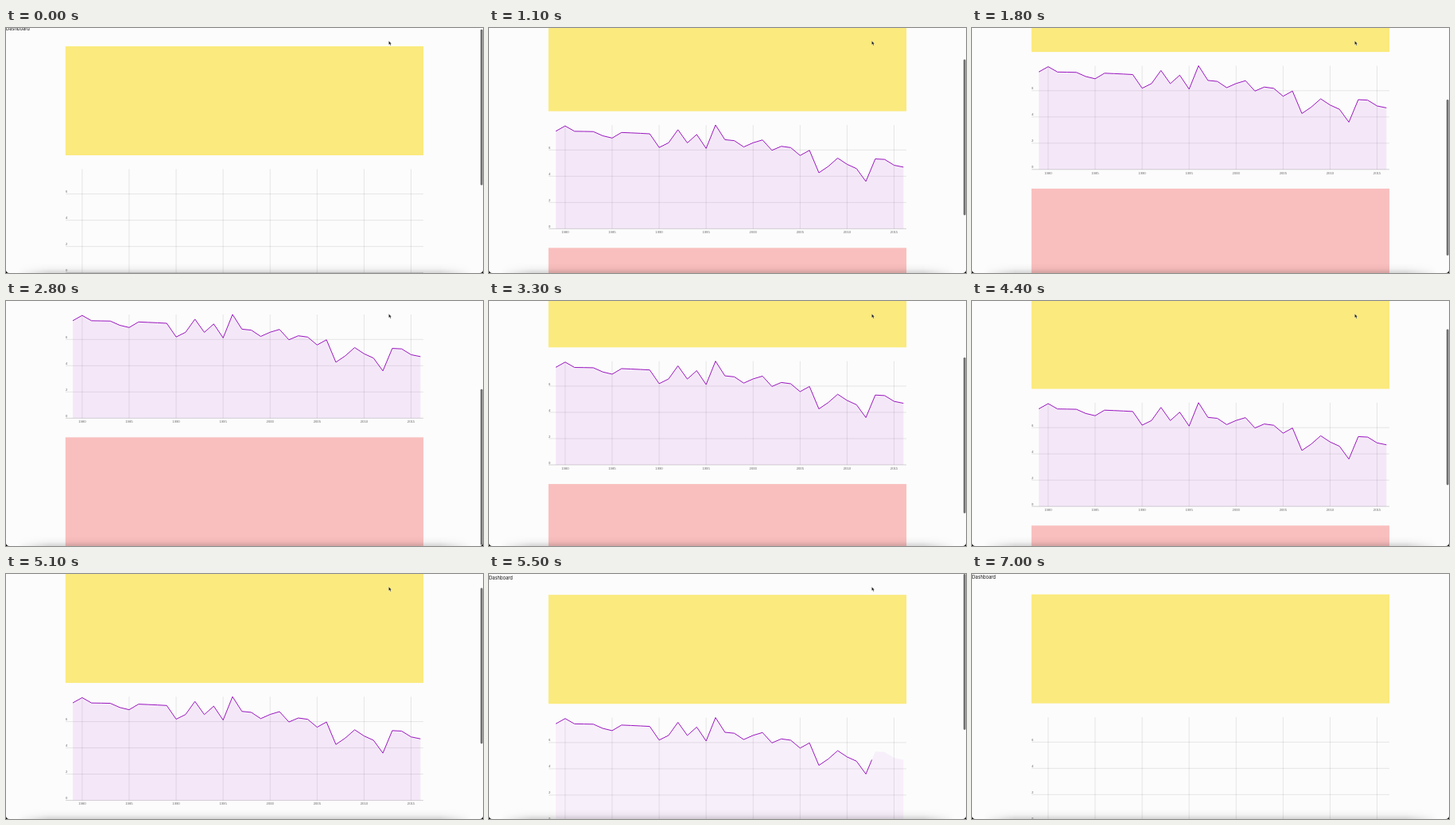
Animation of 600x308 px, one loop 7500 ms. Source, as an HTML page:

```html
<!DOCTYPE html>
<html lang="en">
<head>
<meta charset="utf-8">
<title>Dashboard</title>
<style>
  html, body { margin: 0; width: 100%; height: 100%; overflow: hidden; background: #fcfcfc; }
  svg { display: block; width: 100vw; height: 100vh; }
  text { font-family: "Liberation Sans", Arial, sans-serif; font-size: 4.2px; fill: #666; }
  .title { font-family: Inter, sans-serif; font-size: 5.8px; fill: #111; }
  .grid line { stroke: #000; stroke-opacity: .15; stroke-width: .65; }
  .grid .axis { stroke-opacity: .27; }
  .years { text-anchor: middle; }
  #area { fill: #a010d0; fill-opacity: .083; }
  #line { fill: none; stroke: #9a16be; stroke-width: 1; stroke-linejoin: round; stroke-dasharray: 1 2; }
</style>
</head>
<body>
<svg viewBox="0 0 600 308" preserveAspectRatio="none">
  <defs>
    <linearGradient id="shade" x1="0" y1="0" x2="0" y2="1">
      <stop offset="0" stop-color="#000" stop-opacity="0"/>
      <stop offset=".5" stop-color="#000" stop-opacity=".03"/>
      <stop offset="1" stop-color="#000" stop-opacity=".15"/>
    </linearGradient>
    <linearGradient id="sides">
      <stop offset="0" stop-color="#000"/>
      <stop offset=".07" stop-color="#fff"/>
      <stop offset=".93" stop-color="#fff"/>
      <stop offset="1" stop-color="#000"/>
    </linearGradient>
    <mask id="fadeSides"><rect x="14" y="296" width="572" height="12" fill="url(#sides)"/></mask>
  </defs>
  <rect width="600" height="308" fill="#fcfcfc"/>
  <g id="page">
    <text class="title" x="0" y="6">Dashboard</text>
    <rect x="74.8" y="25.6" width="450.3" height="137" fill="#fbea7d"/>
    <g class="grid" id="grid"></g>
    <g id="levels"></g>
    <g class="years" id="years"></g>
    <path id="area"/>
    <path id="line" pathLength="1"/>
    <rect x="74.8" y="334.4" width="450.3" height="137.2" fill="#f9bfbe"/>
  </g>
  <rect x="14" y="296" width="572" height="12" fill="url(#shade)" mask="url(#fadeSides)"/>
  <path d="M0 304.5Q.3 307.7 4 308H0ZM600 304.5Q599.7 307.7 596 308H600Z" fill="#000"/>
  <rect id="thumb" x="596.8" width="2.8" height="196" rx="1.4" fill="#707070"/>
  <path id="cursor" d="M481.4 16.3V21L482.5 20.1L483.3 22L484.3 21.6L483.5 19.8H485Z" fill="#111" stroke="#fff" stroke-width=".35"/>
</svg>
<script>
const LOOP = 7500, STEP = 100;
const BASE = 310.3, UNIT = 16.5, LEFT = 84, YEAR = 11.82, FIRST = 1979, LAST = 2016;

// The series falls along a parabola; only years that swing clear of it are listed.
const swings = {
  1980: .4, 1984: -.3, 1985: -.45, 1990: -1, 1991: -.6, 1992: .45, 1993: -.5,
  1994: .2, 1995: -.8, 1996: 1.05, 1999: -.4, 2001: .3, 2002: -.4, 2005: -.5,
  2007: -1.6, 2008: -1, 2009: -.25, 2010: -.6, 2011: -.8, 2012: -1.65, 2013: .2, 2014: .3
};
const valueAt = year => 7.43 - .002 * (year - FIRST) ** 2 + (swings[year] || 0);

// Resting points of the scroll, eased in between: [time, offset]
const stops = [
  [0, 2.6], [250, 2.6], [2400, 163], [2800, 163], [3880, 31],
  [4420, 52.2], [4800, 52.2], [5400, -.8], [5700, 0], [LOOP, 0]
];

const $ = id => document.getElementById(id);
const ramp = (t, from, to) => Math.min(1, Math.max(0, (t - from) / (to - from)));
const ease = (t, from, to) => {
  const p = ramp(t, from, to);
  return p * p * (3 - 2 * p);
};
const xAt = year => LEFT + (year - FIRST) * YEAR;
const yAt = value => BASE - value * UNIT;

function add(parent, tag, attrs, text = '') {
  const node = document.createElementNS('http://www.w3.org/2000/svg', tag);
  for (const key in attrs) node.setAttribute(key, attrs[key]);
  node.textContent = text;
  $(parent).append(node);
}

for (let level = 0; level <= 6; level += 2) {
  const y = yAt(level);
  add('grid', 'line', { x1: 75, x2: 525, y1: y, y2: y, class: level ? '' : 'axis' });
  add('levels', 'text', { x: 75, y: y - 1.4 }, level);
}
for (let year = 1980; year < LAST; year += 5) {
  const x = xAt(year);
  add('grid', 'line', { x1: x, x2: x, y1: yAt(7.9), y2: BASE });
  add('years', 'text', { x, y: BASE + 5.8 }, year);
}

const points = [];
for (let year = FIRST; year <= LAST; year++) points.push(`${xAt(year)} ${yAt(valueAt(year))}`);
const outline = 'M' + points.join('L');
$('line').setAttribute('d', outline);
$('area').setAttribute('d', `${outline}V${BASE}H${LEFT}Z`);

function scrollAt(t) {
  const i = stops.findIndex(stop => stop[0] > t);
  const [t0, from] = stops[i - 1], [t1, to] = stops[i];
  return from + (to - from) * ease(t, t0, t1);
}

function render(t) {
  const scroll = scrollAt(t);
  const drawn = ease(t, 150, 1080) - ease(t, 5296, 6446);
  $('page').setAttribute('transform', `translate(0 ${-scroll})`);
  $('line').style.strokeDashoffset = 1 - drawn;
  $('line').style.visibility = drawn > .001 ? 'visible' : 'hidden';
  $('area').style.opacity = ramp(t, 150, 600) - ramp(t, 5420, 5620);
  $('thumb').setAttribute('y', Math.max(0, scroll * .68));
  $('thumb').style.opacity = 1 - ramp(t, 6350, 6600);
  $('cursor').style.visibility = t < 7000 ? 'visible' : 'hidden';
}

const start = performance.now();
function tick() {
  const t = (performance.now() - start) % LOOP;
  render(Math.floor(t / STEP) * STEP);
  requestAnimationFrame(tick);
}
tick();
</script>
</body>
</html>
```
